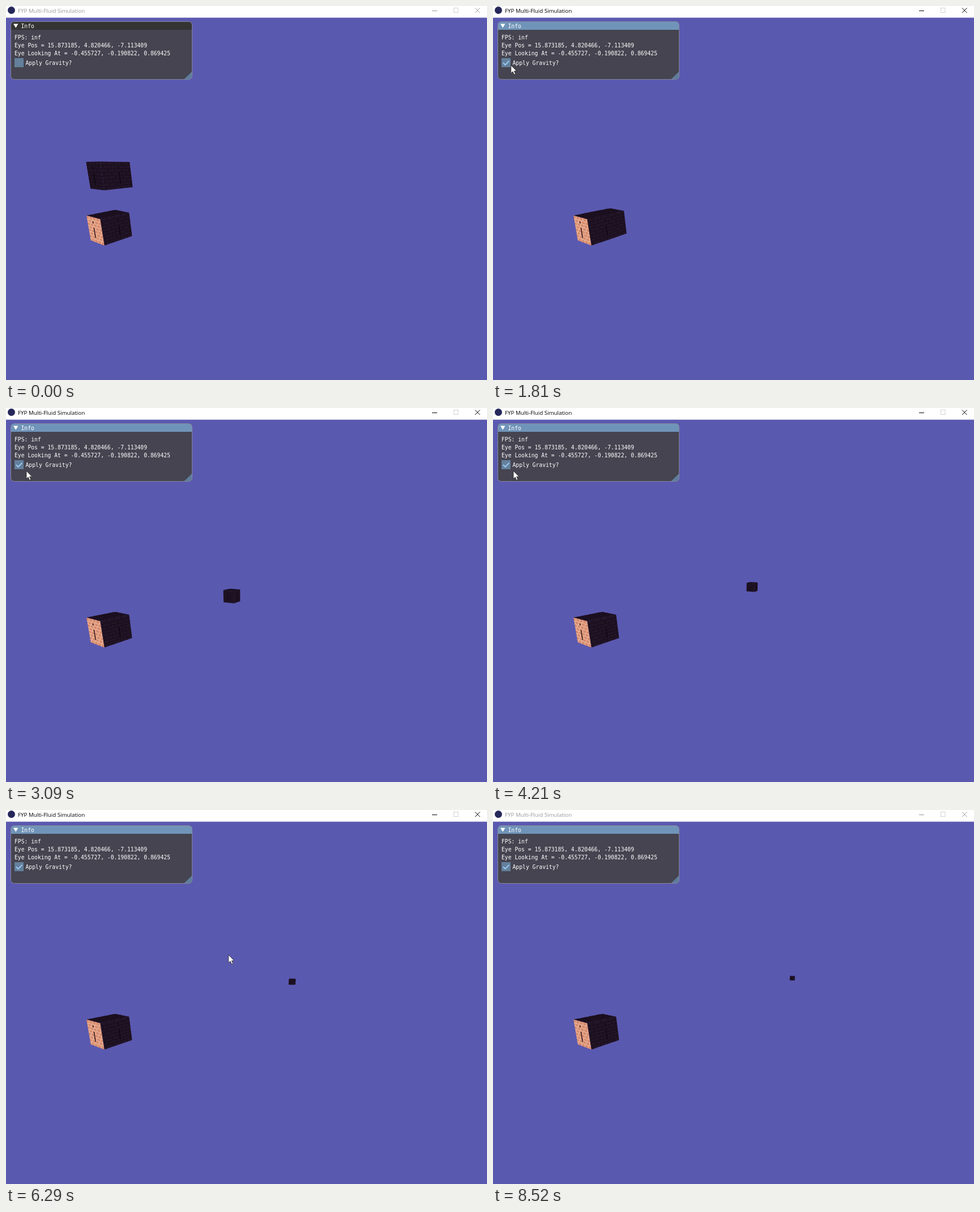
Write an HTML page with a canvas that moves like this. It is 849 px wide and 660 px high and loops after 8600 ms.

```html
<!DOCTYPE html>
<html lang="en">
<head>
<meta charset="utf-8">
<title>Multi-Fluid Simulation</title>
<style>
  html, body { margin: 0; width: 100%; height: 100%; overflow: hidden; background: #5a59b0; }
  canvas, svg { position: absolute; left: 0; top: 0; }
  .caption { font: 9.75px "Open Sans", "Noto Sans", sans-serif; fill: #999; }
  .mono { font: 9.72px "DejaVu Sans Mono", "Liberation Mono", monospace; fill: #fff; white-space: pre; }
  .btn { stroke: #999; fill: none; }
  .focus .caption { fill: #000; }
  .focus .btn { stroke: #000; }
  .bar { fill: #343434; }
  .live .bar { fill: #7094b9; }
  .box { fill: #64809c; }
  .hover .box { fill: #74a6e0; }
  .tick, .ring { visibility: hidden; }
  .checked .tick, .press .ring { visibility: visible; }
</style>
</head>
<body>
<canvas id="scene" width="849" height="660"></canvas>
<svg id="ui" width="849" height="660" viewBox="0 0 849 660">
  <rect width="849" height="20.6" fill="#fff"/>
  <circle cx="9.5" cy="7.5" r="6.5" fill="#26285a"/>
  <text class="caption" x="21" y="11.5">FYP Multi-Fluid Simulation</text>
  <path class="btn" d="M752 8.5h9M828 3.5l8.5 8.5M836.5 3.5l-8.5 8.5"/>
  <rect x="790.5" y="3.5" width="7.5" height="8" fill="none" stroke="#d2d2d2"/>

  <rect x="8.5" y="27.5" width="320" height="102" rx="6" fill="#454450"/>
  <path class="bar" d="M8.5 42V33.5a6 6 0 0 1 6-6h308a6 6 0 0 1 6 6V42z"/>
  <path d="M328.5 115.5v8a6 6 0 0 1-6 6h-8.5z" fill="#5f7d9c"/>
  <rect x="8.5" y="27.5" width="320" height="102" rx="6" fill="none" stroke="#85859a"/>
  <path d="M13 31.5h8.5l-4.25 7z" fill="#fff"/>
  <text class="mono" x="26.5" y="38.5">Info</text>
  <text class="mono" x="15" y="58.5">FPS: inf</text>
  <text class="mono" x="15" y="72.8">Eye Pos = 15.873185, 4.820466, -7.113409</text>
  <text class="mono" x="15" y="87">Eye Looking At = -0.455727, -0.190822, 0.869425</text>
  <rect class="box" x="15" y="92" width="16" height="16"/>
  <path class="tick" d="M18 100.3l3.6 3.6 6.8-7" fill="none" stroke="#9ccbf6" stroke-width="2"/>
  <text class="mono" x="34.5" y="103.8">Apply Gravity?</text>
  <circle class="ring" cx="23.5" cy="94" r="9.5" fill="#c8c21a" fill-opacity=".8"/>
  <path id="cursor" d="M0 0v14l3.2-3 2.3 5.3 2.4-1-2.3-5.1h4.4z" fill="#fff" stroke="#222" stroke-width=".8"/>
</svg>
<script>
const LOOP = 8600, F = 319.5, CX = 423.7, CY = 341.4;
const EYE = [15.873, 4.82, -7.113];
const SIN = 0.1908, COS = 0.9816;      // camera pitch
const YAW_S = 0.4643, YAW_C = 0.8857;  // camera heading
const ui = document.getElementById('ui');
const cursor = document.getElementById('cursor');
const ctx = document.getElementById('scene').getContext('2d');

const DARK = { brick: '#211425', mortar: '#160c1a', crack: '#0d0611' };
const LIT = { brick: '#d88a6c', mortar: '#efc6b0', crack: '#2a1418' };

// Cube faces as functions of u (left to right) and v (top to bottom)
const FACES = {
  top: (u, v) => [2 * u - 1, 1, 1 - 2 * v],
  left: (u, v) => [2 * u - 1, 1 - 2 * v, -1],
  right: (u, v) => [1, 1 - 2 * v, 2 * u - 1]
};

function project(x, y, z) {
  const dx = x - EYE[0], drop = EYE[1] - y, dz = z - EYE[2];
  const side = YAW_C * dx + YAW_S * dz;
  const ahead = YAW_C * dz - YAW_S * dx;
  const depth = ahead * COS + drop * SIN;
  return [CX + F * side / depth, CY - F * (ahead * SIN - drop * COS) / depth, F / depth];
}

function drawFace(face, y, z, skin) {
  const at = (u, v) => {
    const p = face(u, v);
    return project(p[0], p[1] + y, p[2] + z);
  };
  const line = (u1, v1, u2, v2) => {
    const a = at(u1, v1), b = at(u2, v2);
    ctx.moveTo(a[0], a[1]);
    ctx.lineTo(b[0], b[1]);
  };
  const scale = at(0.5, 0.5)[2];
  ctx.beginPath();
  for (const [u, v] of [[0, 0], [1, 0], [1, 1], [0, 1]]) {
    const p = at(u, v);
    ctx.lineTo(p[0], p[1]);
  }
  ctx.closePath();
  ctx.fillStyle = skin.brick;
  ctx.fill();
  ctx.lineWidth = scale * 0.035;
  ctx.strokeStyle = skin.mortar;
  ctx.beginPath();
  const rows = 8, cols = 4;
  for (let r = 0; r < rows; r++) {
    if (r) line(0, r / rows, 1, r / rows);
    for (let c = 0; c < cols; c++) {
      const u = (c + (r % 2 ? 0.25 : 0.75)) / cols;
      line(u, r / rows, u, (r + 1) / rows);
    }
  }
  ctx.stroke();
  if (face === FACES.top) return;
  const u = face === FACES.left ? 0.43 : 0.57;
  ctx.lineWidth = scale * 0.06;
  ctx.strokeStyle = skin.crack;
  ctx.beginPath();
  line(u, 0.42, u, 0.82);
  line(u, 0.17, u, 0.25);
  ctx.stroke();
}

function drawCube(y, z, lit) {
  if (y + 1 < EYE[1]) drawFace(FACES.top, y, z, DARK);
  drawFace(FACES.right, y, z, DARK);
  drawFace(FACES.left, y, z, lit ? LIT : DARK);
}

const FALL = 1410, HIT = 1800, REST_Z = 0.52;

function cubePose(t) {
  if (t < FALL) return [4, REST_Z];
  if (t < HIT) return [4 - 4 * ((t - FALL) / (HIT - FALL)) ** 2, REST_Z];
  const s = (t - 2290) / 1000;
  return [0, Math.max(REST_Z, 7.25 + 13.7 * s - 0.17 * s * s)];
}

const smooth = k => k * k * (3 - 2 * k);

// Each leg: start, end, from, to, easing
const LEGS = [
  [60, 860, [694, 593], [30.5, 102.5], smooth],
  [860, 940, [30.5, 102.5], [24, 93], k => k],
  [1570, 1970, [24, 93], [36, 111], smooth],
  [5730, 6370, [36, 111], [502, 300], k => k * k],
  [6370, 6530, [502, 300], [723, 645], k => k]
];

function cursorPose(t) {
  let leg = LEGS[0];
  for (const l of LEGS) if (t >= l[0]) leg = l;
  const [start, end, a, b, ease] = leg;
  const k = ease(Math.min(1, Math.max(0, (t - start) / (end - start))));
  return a.map((v, i) => v + (b[i] - v) * k);
}

function step(t) {
  if (t < 70) return 0;
  if (t >= 8520) return 8520;
  const base = t < 1330 ? 60 : 1330;
  return base + 80 * Math.floor((t - base) / 80);
}

function render(t) {
  ctx.fillStyle = '#5a59b0';
  ctx.fillRect(0, 0, 849, 660);
  const [y, z] = cubePose(t);
  const above = y > 0;
  if (!above) drawCube(y, z, false);
  drawCube(0, 0, true);
  if (above) drawCube(y, z, false);

  const set = (name, on) => ui.classList.toggle(name, on);
  set('focus', t >= 1330 && t < 8450);
  set('live', t >= 1330);
  set('hover', t >= 1330 && t < 1810);
  set('press', t >= 1330 && t < 1410);
  set('checked', t >= FALL);

  const [x, top] = cursorPose(t);
  cursor.setAttribute('transform', `translate(${x} ${top})`);
  cursor.style.visibility = t >= 60 && t < 6610 ? 'visible' : 'hidden';
}

const begin = performance.now();
function frame() {
  render(step((performance.now() - begin) % LOOP));
  requestAnimationFrame(frame);
}
frame();
</script>
</body>
</html>
```
